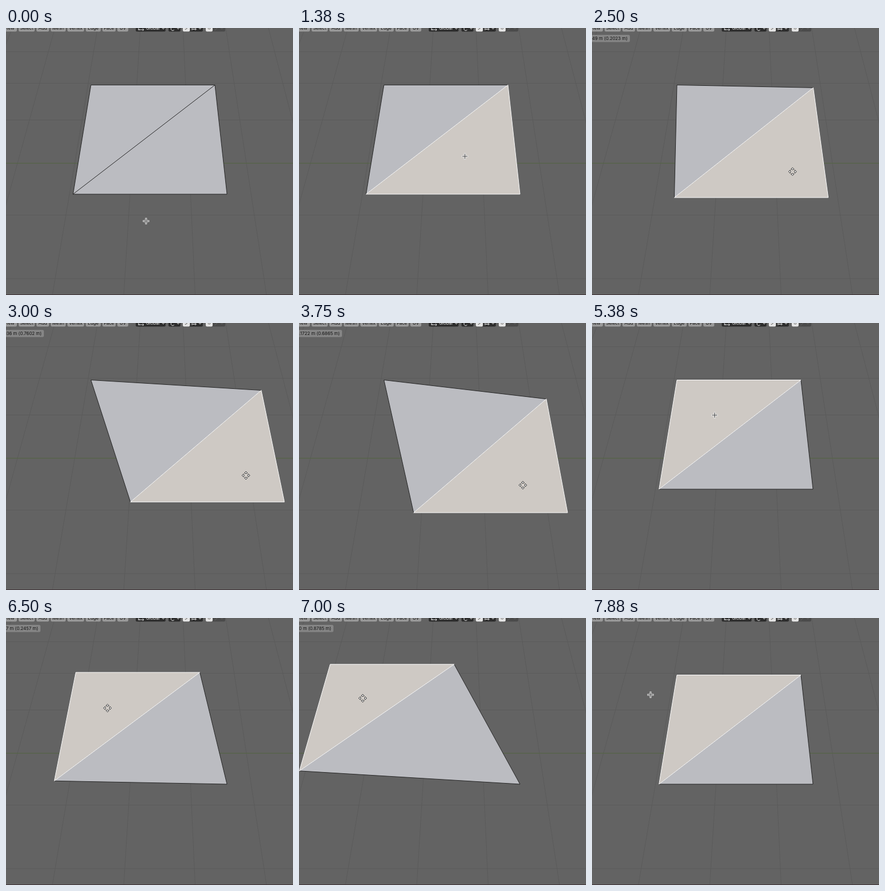
Write an HTML page that moves like this. It is 500 by 466 pixels and loops after 8000 ms.

```html
<!DOCTYPE html>
<html lang="en">
<head>
<meta charset="utf-8">
<title>Moving faces</title>
<style>
  html, body { margin: 0; width: 100%; height: 100%; overflow: hidden; background: #636363; }
  svg { display: block; width: 100%; height: 100%; }
  text { font: 7.8px Inter, "Open Sans", sans-serif; }
</style>
</head>
<body>
<svg viewBox="0 0 500 466">
  <rect width="500" height="466" fill="#636363"/>
  <path id="grid" stroke="#5b5b5b" stroke-width=".9"/>
  <path d="M0 236H500" stroke="#53653f"/>
  <path id="upper"/>
  <path id="lower"/>
  <path id="edges" fill="none" stroke="#161616" stroke-width=".85"/>
  <path id="selection" fill="none" stroke="#fafafa" stroke-linejoin="round"/>
  <g id="header"></g>
  <g id="status">
    <rect id="statusBox" x="-10" y="12" height="12.5" rx="2.5" fill="#858585"/>
    <text id="statusText" y="21" text-anchor="end" fill="#111"></text>
  </g>
  <path d="M0 465.5H500" stroke="#3d3034"/>
  <g id="cross" fill="none">
    <path d="M-5.5 0H5.5M0 -5.5V5.5" stroke="#ececec" stroke-width="3"/>
    <path d="M-4.5 0H4.5M0 -4.5V4.5" stroke="#404040"/>
  </g>
  <g id="mover" fill="#f2f2f2" stroke="#222" stroke-width=".9" stroke-linejoin="round"></g>
</svg>
<script>
const LOOP = 8000, STEP = 125;
const VANISH = { x: 277, y: -694 };
const LAG = 0.55;          // steps the mesh trails behind the hand
const METRES = 7.3;        // metres per pixel at unit distance from the vanishing point
const SELECT_LOWER = 7, SELECT_UPPER = 43;
const GRABS = [{ from: 19, to: 37 }, { from: 51, to: 62 }];

// Places the hand passes: [step, x, y].
const HAND = [
  [0, 244, 337], [3, 276, 257], [11, 289, 224], [16, 315, 243], [18, 315, 243],
  [24, 418, 266], [30, 390, 283], [35, 363, 265], [39, 240, 193], [41, 213, 160],
  [50, 216, 164], [55, 118, 147], [56, 111, 140], [63, 102, 134]
];
const REST = { tl: [148, 99.5], tr: [364, 99.5], bl: [116.8, 290], br: [385, 290] };
const FACES = { upper: ["tl", "tr", "bl"], lower: ["bl", "tr", "br"] };

const $ = id => document.getElementById(id);
const set = (el, attrs) => { for (const k in attrs) el.setAttribute(k, attrs[k]); };
const show = (id, on) => set($(id), { visibility: on ? "visible" : "hidden" });

function handAt(step) {
  const i = Math.max(1, HAND.findIndex(key => key[0] >= step));
  const [s0, x0, y0] = HAND[i - 1], [s1, x1, y1] = HAND[i];
  const f = (step - s0) / (s1 - s0);
  return [x0 + (x1 - x0) * f, y0 + (y1 - y0) * f];
}

function buildGrid() {
  let d = [41, 96, 160, 326, 437].map(y => `M0 ${y}.5H500`).join("");
  for (let x = -79.7; x < 520; x += 99.7) {
    const slope = (x - VANISH.x) / (236 - VANISH.y);
    const at = y => VANISH.x + slope * (y - VANISH.y);
    d += `M${at(0)} 0L${at(466)} 466`;
  }
  set($("grid"), { d });
}

function buildHeader() {
  const pill = (x, width, fill) =>
    `<rect x="${x}" y="-8" width="${width}" height="14.2" rx="2.5" fill="${fill}"/>`;
  const icon = (d, color = "#ddd") => `<path d="${d}" fill="none" stroke="${color}"/>`;
  const chevron = x => icon(`M${x - 2} 0l2 2l2 -2`);
  const menus = { View: 27, Select: 28, Add: 22, Mesh: 26, Vertex: 29, Edge: 26, Face: 23, UV: 19 };
  let html = "", x = -8;
  for (const name in menus) {
    html += pill(x, menus[name], "#999") +
      `<text x="${x + menus[name] / 2}" y="2.8" text-anchor="middle" fill="#151515">${name}</text>`;
    x += menus[name] + 3;
  }
  $("header").innerHTML = html +
    pill(226, 52, "#2d2d2d") + icon("M231 -2V3H240M238 1L240 3L238 5M230 3H233") +
    `<text x="244" y="2.8" fill="#ddd">Global</text>` + chevron(274) +
    pill(283, 21, "#2d2d2d") + icon("M292 -1A3 3 0 1 0 293 3") + chevron(300) +
    pill(308, 35, "#2d2d2d") + pill(308, 12.5, "#e4e4e4") + icon("M312 3L317 -1", "#555") +
    icon("M324 -1V4M327 1V3M330 -1V4M324 2H332") + chevron(338) +
    pill(348, 34, "#4b4b4b") + pill(348, 12, "#e4e4e4") +
    icon("M352 0A2 2 0 1 0 356 0", "#777") + icon("M364 4L369 -1M374 0l2 2l2 -2", "#626262");
}

function buildMover() {
  $("mover").innerHTML = [0, 90, 180, 270].map(angle =>
    `<path transform="rotate(${angle})" d="M0 -7L2.7 -4.2Q0 -2.4 -2.7 -4.2Z"/>`).join("");
}

function drawStatus(step, dx, dy, distance) {
  const metres = pixels => (pixels * METRES / distance).toFixed(4);
  const end = dx < 0 ? 56 : step < 30 ? 62 : 71;
  $("statusText").textContent = `${metres(dy * 0.565)} m (${metres(Math.hypot(dx, dy))} m)`;
  set($("statusText"), { x: end });
  set($("statusBox"), { width: end + 14 });
}

function render(time) {
  const step = Math.floor((time % LOOP) / STEP);
  const selected = step < SELECT_LOWER ? "" : step < SELECT_UPPER ? "lower" : "upper";
  const grab = GRABS.find(g => step >= g.from && step < g.to);
  const points = { ...REST };

  if (grab) {
    const [x0, y0] = handAt(grab.from - 1), [x, y] = handAt(step - LAG);
    const dx = x - x0, dy = y - y0;
    const names = FACES[selected];
    const distance = names.reduce((sum, n) => sum + REST[n][1], 0) / 3 - VANISH.y;
    // Perspective: corners nearer the viewer travel further.
    for (const n of names) {
      const scale = (REST[n][1] - VANISH.y) / distance;
      points[n] = [REST[n][0] + dx * scale, REST[n][1] + dy * scale];
    }
    drawStatus(step, dx, dy, distance);
  }

  const line = names => "M" + names.map(n => points[n].join(" ")).join("L");
  for (const face in FACES)
    set($(face), { d: line(FACES[face]), fill: face === selected ? "#cec9c4" : "#bbbcc1" });
  const outer = { upper: line(["bl", "tl", "tr"]), lower: line(["bl", "br", "tr"]) };
  const plain = Object.keys(outer).filter(face => face !== selected).map(face => outer[face]);
  set($("edges"), { d: plain.join("") + (selected ? "" : line(["bl", "tr"])) });
  set($("selection"), { d: selected ? line(FACES[selected]) + "Z" : "" });

  const transform = `translate(${handAt(step)})`;
  set($("cross"), { transform });
  set($("mover"), { transform });
  show("cross", !grab);
  show("mover", grab);
  show("status", grab);
}

buildGrid();
buildHeader();
buildMover();
const start = performance.now();
function tick() {
  render(performance.now() - start);
  requestAnimationFrame(tick);
}
tick();
</script>
</body>
</html>
```
